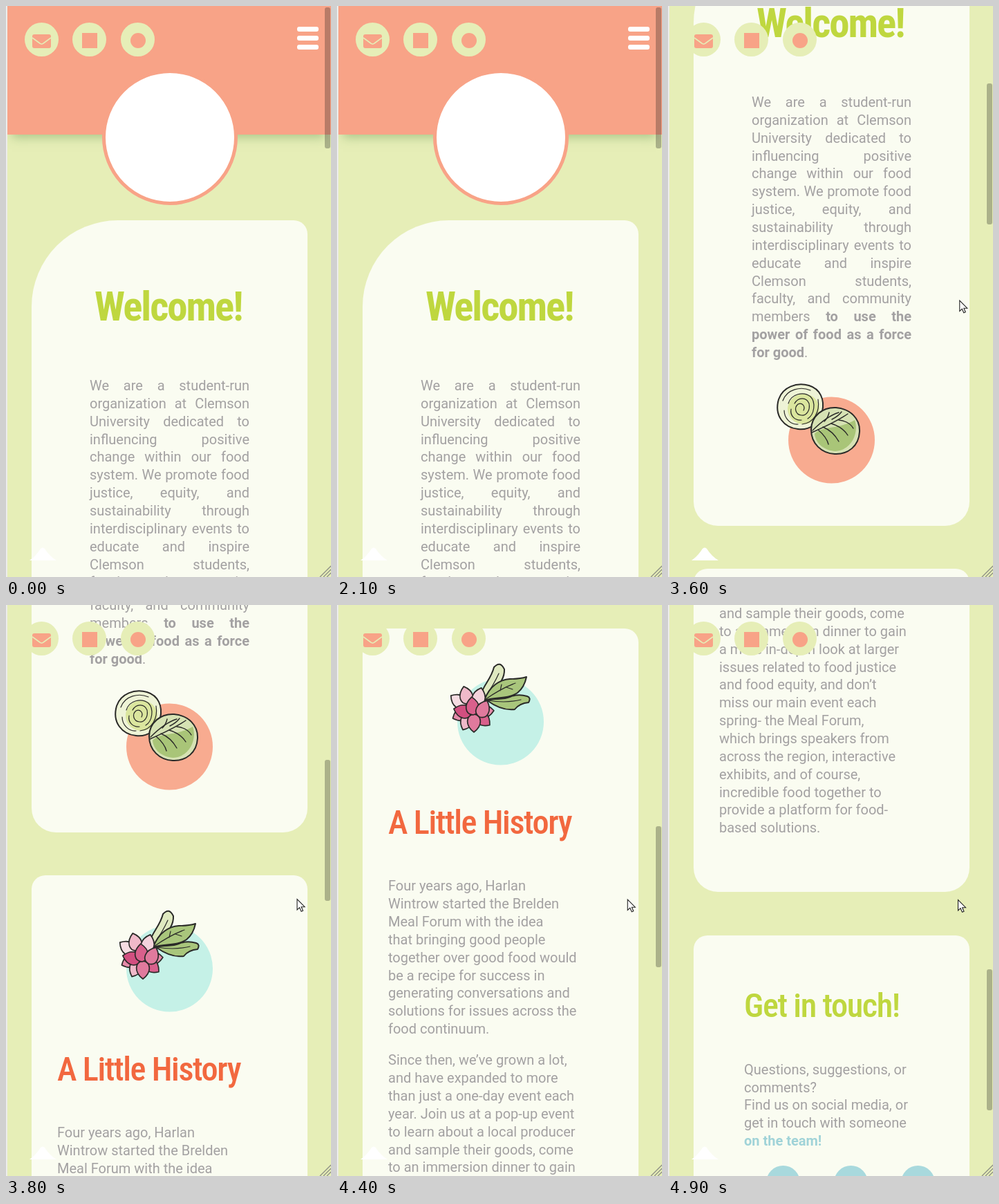
Write an HTML page that moves like this. It is 470 px wide and 826 px high and loops after 5 s.

```html
<!DOCTYPE html>
<html lang="en">
<head>
<meta charset="utf-8">
<title>Food collective page</title>
<style>
html, body { margin: 0; width: 100%; height: 100%; overflow: hidden; }
#stage { position: relative; width: 470px; height: 826px; overflow: hidden; background: #e6eeb7;
  font: 20px/25.85px Roboto, sans-serif; color: #a3a1a2; }
#stage div, #stage svg { position: absolute; }
#page { left: 0; top: 0; width: 470px; height: 3000px; }
#head { left: 0; top: 0; width: 470px; height: 186px; background: #f8a387;
  box-shadow: 0 13px 14px -9px rgba(110, 155, 90, .5); }
#emblem { left: 138.5px; top: 92px; width: 186px; height: 186px; border: 5px solid #f8a387;
  border-radius: 50%; background: #fff; }
.bar { left: 421px; width: 31px; height: 6.5px; border-radius: 3px; background: #fff; }
.card { left: 37.3px; width: 398.7px; background: #fafcf1; border-radius: 20px 20px 35px 35px; }
.text, .title { white-space: nowrap; }
.text span { display: block; }
.just { width: 231px; text-align-last: justify; }
/* a narrow cut is set larger, to the same digit width */
.title { font: 500 43px/60px "Roboto Condensed", Roboto, sans-serif; font-stretch: 75%;
  font-size-adjust: ch-width .5615; margin-top: -30px; letter-spacing: -1.4px; }
.badge { top: 24px; width: 49px; height: 49px; border-radius: 50%; background: #e6eeb7; }
.badge i { position: absolute; left: 13.5px; top: 14.5px; width: 22px; height: 22px; background: #f8a387; }
.dot { top: 2776.5px; width: 49px; height: 49px; border-radius: 50%; background: #a8d9dd; }
#thumb { left: 461px; top: 2px; width: 8px; height: 204px; border-radius: 3px; background: rgba(20, 20, 20, .28); }
</style>
</head>
<body>
<div id="stage">
  <div id="page">
    <div id="head"></div>
    <div id="emblem"></div>
    <div class="bar" style="top:30px"></div>
    <div class="bar" style="top:43px"></div>
    <div class="bar" style="top:56px"></div>

    <div class="card" style="top:309.5px;height:852.5px;border-top-left-radius:125px"></div>
    <div class="title" style="left:128px;top:435px;color:#bfd73f;font-size:53px;font-weight:700;letter-spacing:-2px">Welcome!</div>
    <div class="text just" style="left:121px;top:537.1px">
      <span>We are a student-run</span><span>organization at Clemson</span>
      <span>University dedicated to</span><span>influencing positive</span>
      <span>change within our food</span><span>system. We promote food</span>
      <span>justice, equity, and</span><span>sustainability through</span>
      <span>interdisciplinary events to</span><span>educate and inspire</span>
      <span>Clemson students,</span><span>faculty, and community</span>
      <span>members <b>to use the</b></span><span><b>power of food as a force</b></span>
      <span style="text-align-last:left"><b>for good</b>.</span>
    </div>

    <div class="card" style="top:1224px;height:1156px"></div>
    <div class="title" style="left:74px;top:1505px;color:#f2683f">A Little History</div>
    <div class="text" style="left:74px;top:1584.4px">
      <span>Four years ago, Harlan</span><span>Wintrow started the Brelden</span>
      <span>Meal Forum with the idea</span><span>that bringing good people</span>
      <span>together over good food would</span><span>be a recipe for success in</span>
      <span>generating conversations and</span><span>solutions for issues across the</span>
      <span>food continuum.</span>
    </div>
    <div class="text" style="left:74px;top:1836.4px">
      <span>Since then, we’ve grown a lot,</span><span>and have expanded to more</span>
      <span>than just a one-day event each</span><span>year. Join us at a pop-up event</span>
      <span>to learn about a local producer</span><span>and sample their goods, come</span>
      <span>to an immersion dinner to gain</span><span>a more in-depth look at larger</span>
      <span>issues related to food justice</span><span>and food equity, and don’t</span>
      <span>miss our main event each</span><span>spring- the Meal Forum,</span>
      <span>which brings speakers from</span><span>across the region, interactive</span>
      <span>exhibits, and of course,</span><span>incredible food together to</span>
      <span>provide a platform for food-</span><span>based solutions.</span>
    </div>

    <div class="card" style="top:2443px;height:500px"></div>
    <div class="title" style="left:110px;top:2545px;color:#bfd73f">Get in touch!</div>
    <div class="text" style="left:110px;top:2625.2px">
      <span>Questions, suggestions, or</span><span>comments?</span>
      <span>Find us on social media, or</span><span>get in touch with someone</span>
      <span style="color:#a0d3d8"><b>on the team!</b></span>
    </div>
    <div class="dot" style="left:141.5px"></div>
    <div class="dot" style="left:239.5px"></div>
    <div class="dot" style="left:336.5px"></div>

    <svg style="left:0;top:933px" width="470" height="500" viewBox="0 100 470 500" fill="none" stroke="#2a2a28" stroke-width="2" stroke-linecap="round" stroke-linejoin="round">
      <circle cx="236.5" cy="205" r="62.5" fill="#f8ab90" stroke="none"/>
      <!-- sprouts -->
      <path fill="#eef3d6" d="M160 146C166 128 186 121 204 126C220 131 227 146 223 164C219 182 204 191 188 189C168 187 153 170 160 146Z"/>
      <ellipse cx="196" cy="160" rx="23" ry="22" fill="#dbe69e" stroke="none"/>
      <g stroke-width="1.2">
        <path d="M166 148C172 131 192 127 206 133M217 146C220 164 211 180 194 182M168 162C168 174 178 183 188 182"/>
        <path d="M174 152C178 138 196 134 206 142C214 150 212 168 202 174M178 160C176 170 184 177 193 176"/>
        <path d="M183 152C188 143 200 142 204 152C206 162 200 170 193 169C184 168 182 158 188 153C194 150 199 156 196 162"/>
      </g>
      <path fill="#d6e2b4" d="M207 190C207 170 224 157 243 158C264 160 278 174 277 193C276 213 261 226 241 225C222 224 207 210 207 190Z"/>
      <path fill="#a9c578" stroke="none" d="M212 196C222 184 246 190 270 176C277 196 264 220 242 221C228 220 214 212 212 196Z"/>
      <g stroke-width="1.4">
        <path d="M208 194C226 186 244 178 260 167M209 191C222 178 234 169 247 165"/>
        <path d="M224 186C234 190 242 198 247 207M236 181C246 184 255 190 260 198M247 176C256 177 264 181 268 188M217 190C224 196 230 203 232 211M226 178C230 174 232 170 233 165M237 175C243 172 248 168 251 164"/>
      </g>
      <!-- radishes -->
      <circle cx="236.5" cy="526" r="62.5" fill="#c5f1e7" stroke="none"/>
      <path fill="#dfe9c0" d="M209 495C205 478 222 468 227 447Q236 437 242 450C243 466 229 478 217 495Z"/>
      <path fill="#a9c67c" d="M213 495C220 474 236 465 250 464Q264 464 274 461Q271 476 261 484C248 493 230 490 213 495Z"/>
      <path fill="#a9c67c" d="M217 495C228 492 240 494 250 490Q262 485 275 489Q281 491 277 498Q264 499 257 508C242 510 228 503 217 495Z"/>
      <path stroke-width="1.2" d="M212 494C220 482 228 470 234 456M214 494C228 484 242 476 258 470M218 495C236 498 250 498 266 494M236 481L238 472M245 476L254 479"/>
      <g id="petals"></g>
    </svg>
  </div>

  <div class="badge" style="left:27px">
    <svg style="left:11px;top:16.5px" width="27" height="20">
      <rect width="27" height="20" rx="3" fill="#f8a387"/>
      <path d="M0 5L11 13Q13.5 15 16 13L27 5" fill="none" stroke="#e6eeb7" stroke-width="1.6"/>
    </svg>
  </div>
  <div class="badge" style="left:96px"><i></i></div>
  <div class="badge" style="left:166px"><i style="border-radius:50%"></i></div>

  <svg width="470" height="826" style="left:0;top:0">
    <path d="M34 802Q43 796 50 785Q53 782 56 785Q63 796 73 802Z" fill="#fff"/>
    <path d="M454 826L470 810M459 826L470 815M464 826L470 820" stroke="#8d8f84" stroke-width="1.3"/>
    <rect width="2" height="826" fill="#ececea"/>
    <path id="cursor" d="M.5 .5V16L4 12.7L6.5 18.3L9 17.2L6.6 11.7H11.5Z" fill="#fff" stroke="#222" stroke-width="1.1"/>
  </svg>
  <div id="thumb"></div>
</div>

<script>
const $ = id => document.getElementById(id);

// x, y, angle, colour of each radish
const petals = [
  [186, 503, -55, '#f6dce2'], [190, 500, -15, '#efb9c9'], [202, 502, 15, '#f4d3dc'],
  [201, 512, 85, '#e58aa9'], [191, 510, -115, '#e58aa9'], [193, 514, -155, '#efb9c9'],
  [201, 514, 130, '#d9608c'], [198, 515, 180, '#e07a9d'], [194, 514, -75, '#d24f80'],
  [197, 516, -5, '#d9608c'], [206, 519, 25, '#e07a9d']
];
$('petals').innerHTML = petals.map(([x, y, a, c]) =>
  `<path transform="translate(${x} ${y}) rotate(${a})" fill="${c}" stroke-width="1.7" d="M0 0C-12 -2 -13 -16 0 -26C13 -16 12 -2 0 0Z"/>`
).join('');

// [ms, value...] keys
const scrollKeys = [[3300, 0], [3400, 1], [3500, 130], [3600, 410], [3700, 690], [3800, 833],
  [3900, 890], [4000, 912], [4100, 917], [4200, 917], [4300, 985], [4400, 1190], [4500, 1420],
  [4600, 1602], [4700, 1745], [4800, 1870], [4900, 1965.5]];
const cursorKeys = [[3200, 456, 446], [3300, 431, 430], [3400, 422, 426], [3800, 420.5, 425],
  [4200, 420.5, 425], [4600, 419, 426]];

function at(keys, t, k = 1) {
  const i = keys.findIndex(key => key[0] > t);
  if (i < 0) return keys[keys.length - 1][k];
  if (!i) return keys[0][k];
  const a = keys[i - 1], b = keys[i];
  return a[k] + (b[k] - a[k]) * (t - a[0]) / (b[0] - a[0]);
}

function draw(now) {
  const t = Math.floor(now % 5000 / 100) * 100; // ten pictures a second
  const y = at(scrollKeys, t);
  $('page').style.top = -y + 'px';
  $('thumb').style.top = 2 + y * .2671 + 'px';
  $('cursor').setAttribute('transform', `translate(${at(cursorKeys, t)} ${at(cursorKeys, t, 2)})`);
  $('cursor').style.display = t < 3200 ? 'none' : '';
  requestAnimationFrame(draw);
}
draw(performance.now());
</script>
</body>
</html>
```
